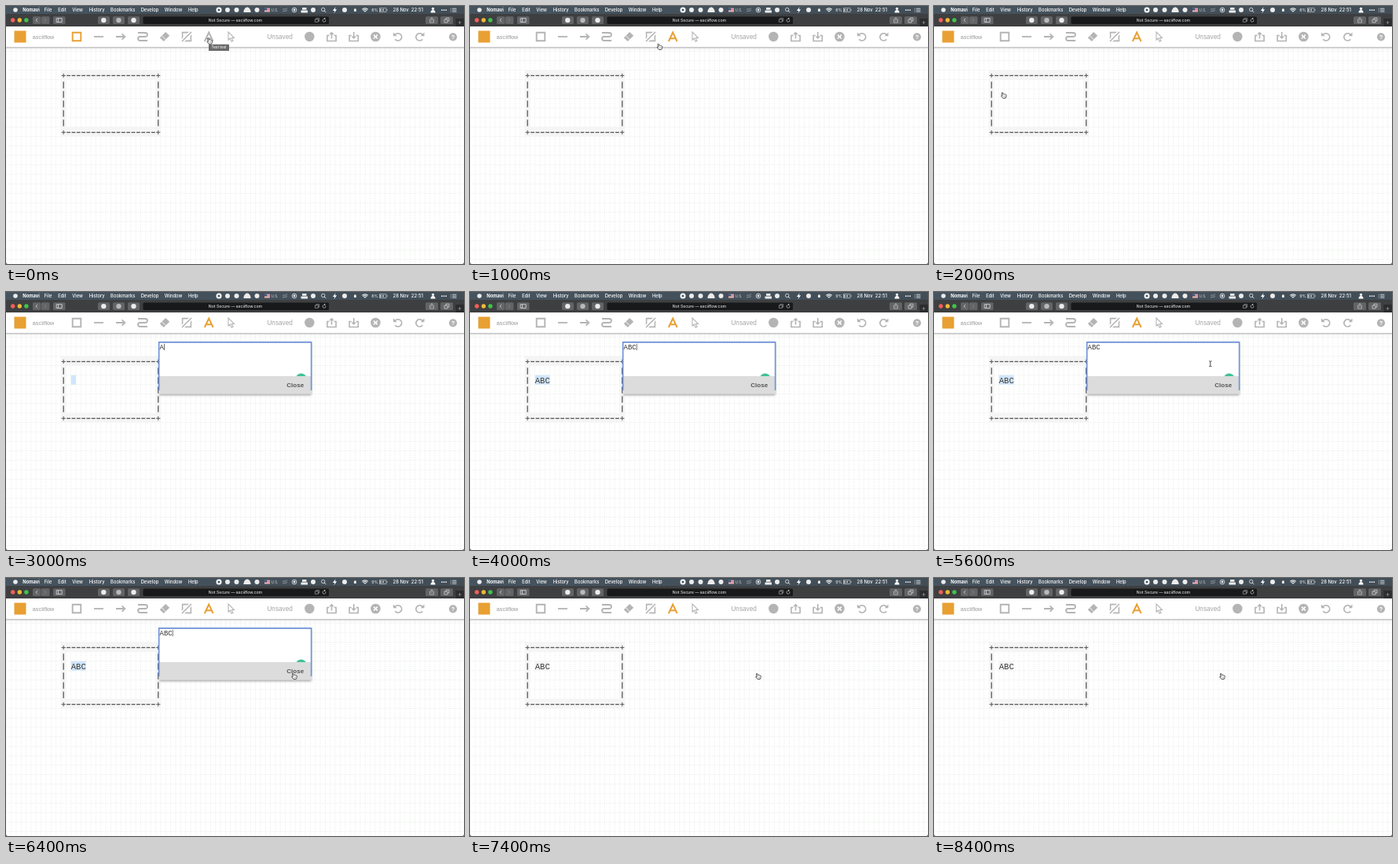
These frames come from a looping animation (583 by 328 pixels, 8.6 s). An HTML page with a canvas:

```html
<!DOCTYPE html>
<html lang="en">
<head>
<meta charset="utf-8">
<title>Drawing a labelled box</title>
<style>
html, body { margin: 0; width: 100%; height: 100%; overflow: hidden; background: #fff; }
canvas { display: block; width: 100vw; height: 100vh; }
</style>
</head>
<body>
<canvas id="stage"></canvas>
<script>
const W = 583, H = 328, LOOP = 8600, STEP = 200;
const CW = 6.345, CH = 12.03, LEFT = 0.25, TOP = 57.6;
const ORANGE = '#e8a033', GREY = '#b4b4b4', LIGHT = '#ececec';
const UI = 'Inter, sans-serif';
const ARIAL = '"Liberation Sans", Arial, sans-serif';
const MONO = '"Liberation Mono", "Courier New", monospace';

const cv = document.getElementById('stage');
const c = cv.getContext('2d');
const dpr = window.devicePixelRatio || 1;
cv.width = Math.round(W * dpr);
cv.height = Math.round(H * dpr);

// Pointer stops: time, x, y
const route = [
  [0, 259.2, 44.6], [800, 259.2, 44.6], [1800, 88.8, 113.6], [4200, 88.8, 113.6],
  [5000, 349, 85], [5400, 349, 85], [6200, 367, 125], [LOOP, 367, 125]
];

function box(x, y, w, h, fill) {
  c.fillStyle = fill;
  c.fillRect(x, y, w, h);
}

function round(x, y, w, h, r, fill) {
  c.fillStyle = fill;
  c.beginPath();
  c.roundRect(x, y, w, h, r);
  c.fill();
}

function dot(x, y, r, fill) {
  c.fillStyle = fill;
  c.beginPath();
  c.arc(x, y, r, 0, Math.PI * 2);
  c.fill();
}

function ring(x, y, r, color, width = 0.8, a = 0, b = Math.PI * 2) {
  c.strokeStyle = color;
  c.lineWidth = width;
  c.beginPath();
  c.arc(x, y, r, a, b);
  c.stroke();
}

function path(d, color, width, x = 0, y = 0) {
  c.save();
  c.translate(x, y);
  c.strokeStyle = color;
  c.lineWidth = width;
  c.stroke(new Path2D(d));
  c.restore();
}

function shape(d, color, x = 0, y = 0) {
  c.save();
  c.translate(x, y);
  c.fillStyle = color;
  c.fill(new Path2D(d));
  c.restore();
}

function text(s, x, y, font, color, align = 'center', base = 'middle') {
  c.font = font;
  c.fillStyle = color;
  c.textAlign = align;
  c.textBaseline = base;
  c.fillText(s, x, y);
}

function menuBar(t) {
  const g = c.createLinearGradient(0, 0, W, 0);
  g.addColorStop(0, '#46545f');
  g.addColorStop(1, '#414d57');
  box(0, 0, W, 10, g);
  dot(12, 5, 2.8, LIGHT);
  text('Nomavi', 32, 5.4, '700 5.8px ' + UI, '#fff');
  const menus = [['File', 53.5], ['Edit', 71.5], ['View', 91], ['History', 115.7],
    ['Bookmarks', 148.7], ['Develop', 183], ['Window', 213], ['Help', 238.3]];
  for (const [s, x] of menus) text(s, x, 5.4, '500 5.8px ' + UI, '#fff');

  dot(271, 5, 3.5, '#fff');
  dot(271, 5, 1.5, '#46545f');
  for (const x of [282, 293.5, 319.5, 391, 431]) dot(x, 5, 3, LIGHT);
  ring(367, 5, 2.9, LIGHT);
  dot(367, 5, 1.4, LIGHT);
  shape('M-4.5 2.5V1Q-3-4 0-4Q3-4 4.5 1V2.5Z', LIGHT, 307, 5.5);

  box(329, 2.8, 7, 4.6, '#f4eded');
  for (let i = 0; i < 4; i++) box(329, 2.8 + i * 1.3, 7, 0.65, '#c9545a');
  box(329, 2.8, 3.2, 2.5, '#40588d');
  text('U.S.', 342, 5.3, '4.6px ' + UI, '#ddd');
  path('M-3 2.2Q-1 .5 0 1.4T3 0M-3-.4Q-1-2 0-1T3-2.4', '#aaa', 0.8, 355, 5);
  box(375.5, 5.5, 8.5, 3, LIGHT);
  box(377, 2, 5.5, 2.8, LIGHT);
  ring(403.7, 4.5, 2.2, LIGHT);
  path('M1.4 1.4L3.6 3.6', LIGHT, 0.9, 403.7, 4.5);
  shape('M1-4L-2.6 .8H-.2L-1 4L2.6-1H.3Z', '#fff', 418.5, 5.2);
  box(443, 3.5, 2.8, 3.5, LIGHT);
  for (let i = 1; i < 4; i++) ring(457, 8.3, i * 1.8, LIGHT, 1.1, -2.35, -0.79);
  text(t < 4000 ? '8%' : '9%', 469.5, 5.4, '5.4px ' + UI, '#f2f2f2');
  c.strokeStyle = '#ddd';
  c.lineWidth = 0.6;
  c.strokeRect(475.5, 2.8, 8.5, 4.6);
  box(476.3, 3.6, 1.3, 3, '#eee');
  box(484.6, 4.2, 0.8, 1.8, '#ddd');
  shape('M.6-2L-1.3.4H0L-.5 2L1.4-.4H.2Z', '#fff', 480, 5.1);
  text('28 Nov  22:51', 511.7, 5.4, '500 5.9px ' + UI, '#fff');
  dot(543.5, 3.3, 1.6, '#fff');
  shape('M-3 3.5Q-3 0 0 0Q3 0 3 3.5Z', '#fff', 543.5, 5);
  for (let i = -1; i < 2; i++) {
    dot(557.5 + i * 2.6, 5.2, 0.9, '#eee');
    box(568, 4.8 + i * 2, 5.5, 0.8, '#eee');
    box(565.8, 4.8 + i * 2, 1, 0.8, '#eee');
  }
}

function browserBar() {
  box(0, 10, W, 16, '#3e3f41');
  ['#f35f58', '#f2b936', '#3fc44b'].forEach((f, i) => dot(8.7 + i * 8.6, 18, 2.7, f));
  const buttons = [[34, 10.5], [45, 10.5], [60, 15.5], [117, 15], [136, 15],
    [155, 15], [534, 16], [553, 16]];
  for (const [x, w] of buttons) round(x, 13.3, w, 9.6, 1.5, '#626466');
  path('M1.2-2.2L-1 0L1.2 2.2', '#ddd', 0.8, 39, 18.1);
  path('M-1.2-2.2L1 0L-1.2 2.2', '#888', 0.8, 50, 18.1);
  path('M-3.5-2.4H3.5V2.4H-3.5ZM-1.2-2.4V2.4', '#ddd', 0.8, 67.7, 18.1);
  dot(124.3, 18.1, 3.2, LIGHT);
  dot(143.5, 18.1, 3.2, '#b8b9ba');
  dot(162.5, 18.1, 3.2, LIGHT);

  round(174.5, 13.5, 236.5, 9.4, 1.5, '#17191a');
  text('Not Secure — asciiflow.com', 292, 18.5, '500 5.1px ' + UI, '#dedede');
  path('M-2.6-1.2H1.4V2.2H-2.6ZM-1.2-1.2V-2.4H2.8V1H1.4', '#bbb', 0.6, 396, 18.1);
  ring(405, 18.3, 2, '#ccc', 0.7, -0.4, 4.6);
  shape('M0-3.4L2-2L0-.8Z', '#ccc', 405, 18.1);
  path('M-1.2-1H-2.4V3H2.4V-1H1.2M0 1V-3.2M-1.3-2L0-3.3L1.3-2', '#ddd', 0.6, 542, 18);
  path('M-3-.8H1V3H-3ZM-1-.8V-2.8H3V1H1', '#ddd', 0.7, 561, 18);
  box(572.5, 16, 10.5, 10, '#2b2d2f');
  path('M-2 0H2M0-2V2', '#aaa', 0.6, 577.5, 21);
}

function grid() {
  box(0, 26, W, H, '#fff');
  c.strokeStyle = '#e1e8e1';
  c.lineWidth = 0.7;
  c.setLineDash([1.4, 1.4]);
  c.beginPath();
  for (let x = LEFT; x < W; x += CW) {
    c.moveTo(x, 53);
    c.lineTo(x, H);
  }
  for (let y = TOP; y < H; y += CH) {
    c.moveTo(0, y);
    c.lineTo(W, y);
  }
  c.stroke();
  c.setLineDash([]);
}

const strokes = { '-': 'M-2.4 0H2.4', '|': 'M0-4.2V4.2', '+': 'M-2.6 0H2.6M0-2.6V2.6' };

function cell(ch, col, row, fill) {
  const x = LEFT + col * CW, y = TOP + row * CH;
  box(x, y, CW, CH, fill);
  if (strokes[ch]) path(strokes[ch], '#585858', ch === '+' ? 1 : 1.3, x + CW / 2, y + 6.8);
  else text(ch, x + CW / 2, y + CH - 2.1, '10.6px ' + MONO, '#3c3c3c', 'center', 'alphabetic');
}

function diagram(t) {
  const fill = '#f4f5f4';
  for (let i = 0; i < 20; i++) {
    const ch = i % 19 ? '-' : '+';
    cell(ch, 11 + i, 2, fill);
    cell(ch, 11 + i, 8, fill);
  }
  for (let r = 3; r < 8; r++) {
    cell('|', 11, r, fill);
    cell('|', 30, r, fill);
  }
  const open = t >= 2400 && t < 6800;
  const n = t < 3200 ? 0 : t < 3600 ? 1 : t < 4000 ? 2 : 3;
  const mark = open ? '#d0e6fa' : fill;
  if (open && !n) cell('', 13, 4, mark);
  for (let i = 0; i < n; i++) cell('ABC'[i], 13 + i, 4, mark);
}

function toolbar(t) {
  c.save();
  c.shadowColor = 'rgba(0,0,0,.35)';
  c.shadowBlur = 2.5 * dpr;
  c.shadowOffsetY = 0.6 * dpr;
  box(-5, 26, W + 10, 26, '#fff');
  c.restore();

  const typing = t >= 600;
  round(10.5, 31.5, 15, 15, 0, ORANGE);
  text('asciiflow', 33.8, 39.6, '7.3px ' + ARIAL, '#999', 'left');

  path('M-5.3-5.3H5.3V5.3H-5.3Z', typing ? GREY : ORANGE, 1.9, 90, 39);
  path('M-6 0H6', GREY, 1.8, 118, 39);
  path('M-6 0H4M1.5-3.7L5.5 0L1.5 3.7', GREY, 1.8, 146, 39);
  path('M-6-5H3Q6-5 6-2.5Q6 0 3 0H-3Q-6 0-6 2.5Q-6 5-3 5H6', GREY, 1.8, 174, 39);
  shape('M-6.2 1.3L1.2-6L6.2-1.3L-1.2 6Z', GREY, 202, 39);
  path('M-3.6-1.2L1.2 3.6', '#fff', 1, 202, 39);
  path('M-5.4-5.4H5.4V5.4H-5.4Z', GREY, 1.6, 230, 39);
  path('M-7 7L7-7', '#fff', 4.6, 230, 39);
  path('M-6 6L6-6', GREY, 1.6, 230, 39);
  path('M-5.4 6L0-5.4L5.4 6M-3.3 2.3H3.3', typing ? ORANGE : GREY, 2, 258.2, 39);
  path('M-3-6V4L-.7 2.2L1.2 6.2L3 5.3L1.2 1.5H4.5Z', GREY, 1.1, 286, 39);

  text('Unsaved', 348.6, 39.7, '8.2px ' + ARIAL, '#a4a4a4');
  dot(386.3, 39, 6.2, GREY);
  const tray = 'M-3-1.5H-5.6V5.5H5.6V-1.5H3';
  path(tray + 'M0 2.5V-4', GREY, 1.6, 414.5, 39);
  shape('M-3.3-2.8L0-6.3L3.3-2.8Z', GREY, 414.5, 39);
  path(tray + 'M0-6V0', GREY, 1.6, 442.7, 39);
  shape('M-3.3-.5L0 3L3.3-.5Z', GREY, 442.7, 39);
  dot(470.4, 39, 6.3, GREY);
  path('M-2.4-2.4L2.4 2.4M2.4-2.4L-2.4 2.4', '#fff', 1.5, 470.4, 39);
  ring(499, 39.4, 4.6, GREY, 1.7, -2.7, 2.5);
  shape('M-6-5.5V-.8H-1.3Z', GREY, 499, 39);
  ring(526.5, 39.4, 4.6, GREY, 1.7, 0.65, 5.85);
  shape('M6-5.5V-.8H1.3Z', GREY, 526.5, 39);
  dot(569, 39.3, 5.1, GREY);
  text('?', 569, 39.7, '700 7.5px ' + ARIAL, '#fff');

  if (!typing) {
    round(258, 48.8, 26, 8.2, 0.6, '#6a6a6a');
    text('Text tool', 271, 53.1, '500 4.6px ' + UI, '#fff');
  }
}

function dialog(t) {
  if (t < 2400 || t >= 6800) return;
  c.save();
  c.shadowColor = 'rgba(0,0,0,.4)';
  c.shadowBlur = 3 * dpr;
  c.shadowOffsetY = dpr;
  box(194.5, 64, 194.5, 65.8, '#dcdcdc');
  c.restore();
  box(195, 64, 193.5, 43, '#fff');
  c.save();
  c.beginPath();
  c.rect(195, 64, 193, 43);
  c.clip();
  dot(375.7, 110, 6.6, '#3fc295');
  c.restore();
  path('M194.7 125V63.9H388.6V125', '#6f92d8', 1.6);
  text('Close', 368.2, 118.3, '700 8px ' + ARIAL, '#555');

  const n = t < 2800 ? 0 : t < 3400 ? 1 : t < 3800 ? 2 : 3;
  text('ABC'.slice(0, n), 195.6, 73, '8.9px ' + MONO, '#333', 'left', 'alphabetic');
  const caret = t < 4200 || Math.floor((t - 4200) / 600) % 2 === 1;
  if (caret) box(195.8 + n * 5.34, 65.8, 0.7, 8.4, '#333');
}

function pointer(t) {
  if (t >= 2800 && t < 4200) return;
  let i = 0;
  while (i < route.length - 2 && t >= route[i + 1][0]) i++;
  const [t0, x0, y0] = route[i], [t1, x1, y1] = route[i + 1];
  const u = (t - t0) / (t1 - t0), e = u * u * (3 - 2 * u);
  const x = x0 + (x1 - x0) * e, y = y0 + (y1 - y0) * e;
  const inField = t >= 2400 && t < 6800 && x > 195 && x < 388 && y > 64 && y < 107;
  if (inField) {
    path('M-1.7-3.5Q0-3.5 0-2.6Q0-3.5 1.7-3.5M0-2.6V2.6M-1.7 3.5Q0 3.5 0 2.6Q0 3.5 1.7 3.5',
      '#333', 0.9, x, y);
    return;
  }
  const hand = 'M-2.6-3.2Q-2-4.2-1.2-3.2L-.6-1.5Q.2-2.2.9-1.4Q1.7-1.9 2.2-1' +
    'Q3.2-1.2 3.2 0V1.6L2.3 3.6H-1L-3.2.9Q-3.4-.1-2.4.1L-1.7.6Z';
  shape(hand, '#fff', x, y);
  path(hand, '#333', 0.85, x, y);
  path('M.2.5V2M1.5.5V2', '#555', 0.5, x, y);
}

function draw(t) {
  c.setTransform(cv.width / W, 0, 0, cv.height / H, 0, 0);
  grid();
  diagram(t);
  toolbar(t);
  browserBar();
  menuBar(t);
  dialog(t);
  pointer(t);
  shape('M0 326V328H2Q0 328 0 326Z', '#222');
  shape('M583 326V328H581Q583 328 583 326Z', '#222');
}

let last = -1;
function tick() {
  const t = Math.floor((performance.now() % LOOP) / STEP) * STEP;
  if (t !== last) draw(last = t);
  requestAnimationFrame(tick);
}
tick();
</script>
</body>
</html>
```
